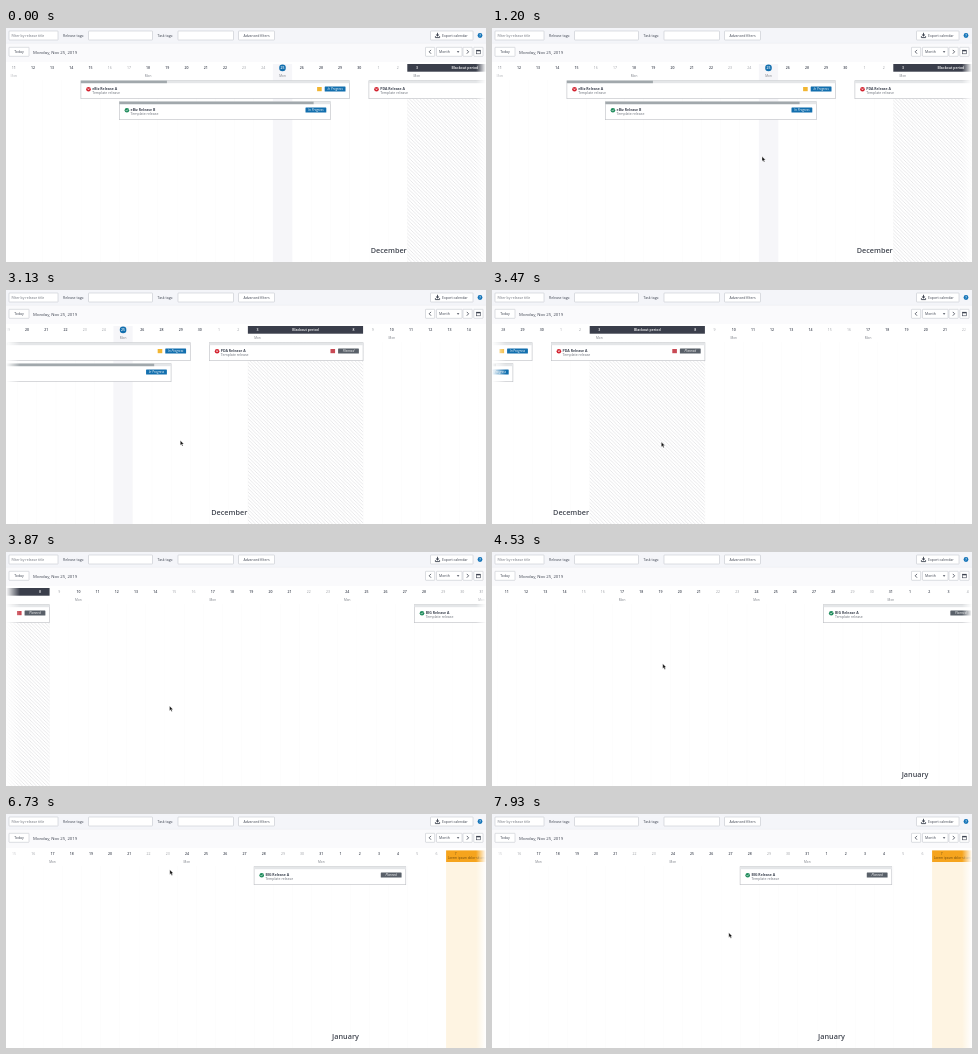
Recreate the animation shown at these times as an HTML page. Size 480 px wide and 234 px high, loop 8000 ms.

```html
<!DOCTYPE html>
<html lang="en">
<head>
<meta charset="utf-8">
<title>Release calendar</title>
<style>
html, body { margin: 0; width: 100%; height: 100%; overflow: hidden; background: #fff; }
svg { display: block; width: 100%; height: 100%; }
text { font: 3.5px "Open Sans", sans-serif; fill: #3d4350; }
.bold { font-weight: 700; }
.white { font-weight: 600; fill: #fff; }
.day { font-weight: 600; }
.off { fill: #9a9da3; }
.soft { fill: #6b7079; }
.mon { font-size: 3.1px; fill: #777b83; }
.tag { font-size: 3.2px; font-style: italic; fill: #fff; }
.date { font-size: 4.3px; }
.month { font-size: 7.25px; font-weight: 600; fill: #40454f; }
.event { font-size: 3.1px; fill: #6b4a10; }
</style>
</head>
<body>
<svg viewBox="0 0 480 234">
  <defs>
    <pattern id="hatch" width="3.5" height="3.5" patternUnits="userSpaceOnUse">
      <path d="M-1-1L4.5 4.5M-1 2.5L1 4.5M2.5-1L4.5 1" stroke="#d6d6d8" stroke-width=".55"/>
    </pattern>
    <linearGradient id="fade"><stop stop-color="#fff"/><stop offset="1" stop-color="#fff" stop-opacity="0"/></linearGradient>
  </defs>
  <g id="board"></g>
  <rect y="34" width="14" height="200" fill="url(#fade)"/>
  <rect y="34" width="10" height="200" fill="url(#fade)" transform="matrix(-1 0 0 1 480 0)"/>
  <g id="tools"></g>
  <path id="cursor" d="M0 0V4.7L1.1 3.8L1.9 5.6L2.8 5.2L2 3.5H3.5Z" fill="#111" stroke="#fff" stroke-width=".35"/>
</svg>
<script>
const LOOP = 8000, DAY = 19.2, HALF = DAY / 2;
const INK = "#3d4350", BLUE = "#126fae";
const board = document.getElementById("board");
const tools = document.getElementById("tools");
const cursor = document.getElementById("cursor");

function add(parent, tag, attrs, content) {
  const el = document.createElementNS("http://www.w3.org/2000/svg", tag);
  for (const k in attrs) el.setAttribute(k, attrs[k]);
  if (content !== undefined) el.textContent = content;
  parent.appendChild(el);
  return el;
}
const rect = (p, x, y, width, height, fill, more) =>
  add(p, "rect", { x, y, width, height, fill, ...more });
const path = (p, d, stroke, width = .6) =>
  add(p, "path", { d, stroke, fill: "none", "stroke-width": width });
const dot = (p, cx, cy, r, fill) => add(p, "circle", { cx, cy, r, fill });
const text = (p, x, y, str, cls = "", anchor = "start") =>
  add(p, "text", { x, y, class: cls, "text-anchor": anchor }, str);
const mid = (p, x, y, str, cls) => text(p, x, y, str, cls, "middle");
const box = (x, y, w) =>
  rect(tools, x, y, w, 9, "#fff", { stroke: "#b9bdc4", "stroke-width": .5, rx: .5 });

function buildTools() {
  const g = tools;
  rect(g, 0, 0, 480, 15, "#f4f5f9");
  rect(g, 0, 15, 480, 19, "#fafafc");
  rect(g, 0, 14.9, 480, .4, "#e3e5ea");

  for (const [x, w] of [[3, 49], [82.5, 64], [172, 55.5], [232.5, 36], [424.5, 42.5]]) box(x, 3, w);
  text(g, 5.5, 8.8, "Filter by release title", "soft");
  text(g, 57, 8.6, "Release tags:");
  text(g, 151.5, 8.8, "Task tags:");
  mid(g, 250.5, 8.7, "Advanced filters");
  path(g, "M431.5 4.8V7.5M429.4 8.2V9.6H433.6V8.2", INK, .9);
  add(g, "path", { d: "M429.7 6.6H433.3L431.5 8.7Z", fill: INK });
  text(g, 436, 8.8, "Export calendar");
  dot(g, 474, 7.5, 2.4, "#1474b8");
  mid(g, 474, 8.7, "?", "white");

  for (const [x, w] of [[3, 20], [419.5, 9.2], [430.5, 25.5], [457, 9.2], [467.8, 9.2]]) box(x, 19.3, w);
  mid(g, 13, 25.1, "Today");
  text(g, 27, 25.7, "Monday, Nov 25, 2019", "date");
  path(g, "M425 21.9l-1.8 1.9l1.8 1.9M460.8 21.9l1.8 1.9l-1.8 1.9", INK, .8);
  text(g, 433, 25.1, "Month");
  add(g, "path", { d: "M450.8 23.2h2.6l-1.3 1.5Z", fill: INK });
  rect(g, 470.6, 22.2, 3.7, 3.6, "none", { stroke: INK, "stroke-width": .6 });
  rect(g, 470.6, 22, 3.7, 1.3, INK);
}

// Day numbers by offset from the highlighted day
const dayNumber = d => d < 2 ? 25 + d : d < 5 ? 26 + d : d < 36 ? d - 4 : d - 35;

function release({ name, from, days, row = 0, done = 0, ok, planned, flag }) {
  const g = board, x = from * DAY, w = days * DAY, y = 52.7 + row * 21, end = x + w;
  rect(g, x, y, w, 18, "#fff", { stroke: "#bdbfc4", "stroke-width": .6 });
  rect(g, x, y, w, 2.5, "#e4e6e8");
  rect(g, x, y, w * done, 2.5, "#a1a8ac");

  const cx = x + 7.6, cy = y + 8.5;
  dot(g, cx, cy, 2.3, ok ? "#1e8b5b" : "#d3222f");
  path(g, ok ? `M${cx - 1.1} ${cy}l.8.9l1.5-1.7` : `M${cx - .8} ${cy - .8}l1.6 1.6m0-1.6l-1.6 1.6`, "#fff");
  text(g, x + 11.3, y + 9.3, name, "bold");
  text(g, x + 11.3, y + 13.3, "Template release", "soft");

  rect(g, end - 25, y + 5.9, 20.8, 5, planned ? "#596069" : BLUE, { rx: .4 });
  mid(g, end - 14.6, y + 9.5, planned ? "Planned" : "In Progress", "tag");
  if (flag) rect(g, end - 32.6, y + 6.3, 4.6, 4.2, flag);
}

function buildBoard() {
  const g = board;
  rect(g, -HALF, 36, DAY, 198, "#f6f6f9");
  for (let d = -16; d < 42; d++) {
    const x = d * DAY, week = (d + 70) % 7;
    rect(g, x - HALF, 52, .3, 182, "#f7f7f8");
    mid(g, x, 41.2, dayNumber(d), week > 4 ? "off" : "day");
    if (week === 0) mid(g, x, 48.5, "Mon", "mon");
  }
  dot(g, 0, 39.9, 3.3, BLUE);
  mid(g, 0, 41.2, 25, "white");

  const from = 6.5 * DAY, width = 6 * DAY;
  rect(g, from, 52.5, width, 181.5, "url(#hatch)");
  rect(g, from, 36, width, 7.7, "#3a3e4b");
  mid(g, from + HALF, 41.2, 3, "white");
  mid(g, from + width / 2, 41.2, "Blackout period", "white bold");
  mid(g, from + width - HALF, 41.2, 8, "white");

  const event = 41.5 * DAY;
  rect(g, event, 48, 100, 186, "#fef4e2");
  rect(g, event, 36.4, 100, 11.6, "#f6a41d");
  mid(g, event + HALF, 41.2, 7, "event");
  text(g, event + 1.8, 45, "Lorem ipsum dolor sit amet", "event");

  text(g, 4.5 * DAY + 1.8, 225.3, "December", "month");
  text(g, 35.5 * DAY + 1.2, 225.3, "January", "month");

  release({ name: "eBiz Release A", from: -10.5, days: 14, done: .32, flag: "#f2b632" });
  release({ name: "eBiz Release B", from: -8.5, days: 11, row: 1, done: .92, ok: true });
  release({ name: "PDA Release A", from: 4.5, days: 8, planned: true, flag: "#c94a55" });
  release({ name: "BIG Release A", from: 31.5, days: 7.9, planned: true, ok: true });
}

// Straight moves between a few keys: time, then values
const scroll = [[0, 276.5], [2070, 276.5], [2530, 210.3], [3130, 117.5], [3870, -196.3], [5250, -356.7]];
const pointer = [[0, 142, 240], [470, 142, 240], [600, 329, 63], [1000, 270, 128.5], [1200, 270, 128.5],
  [2070, 284, 133], [2530, 217.5, 134], [3130, 174.3, 150.5], [3870, 163.5, 154], [5470, 181, 52],
  [5900, 472, 44], [6270, 186, 39], [6620, 186, 39], [6930, 124, 86], [7070, 124, 86],
  [7500, 272, 100], [7930, 236.8, 118.7]];

function sample(keys, t) {
  const i = keys.findIndex(k => k[0] > t);
  if (i < 0) return keys[keys.length - 1].slice(1);
  const a = keys[i - 1], b = keys[i], u = (t - a[0]) / (b[0] - a[0]);
  return a.slice(1).map((v, n) => v + (b[n + 1] - v) * u);
}

function draw(t) {
  board.setAttribute("transform", `translate(${sample(scroll, t)} 0)`);
  cursor.setAttribute("transform", `translate(${sample(pointer, t)})`);
}

buildTools();
buildBoard();
const start = performance.now();
function tick() {
  draw((performance.now() - start) % LOOP);
  requestAnimationFrame(tick);
}
tick();
</script>
</body>
</html>
```
